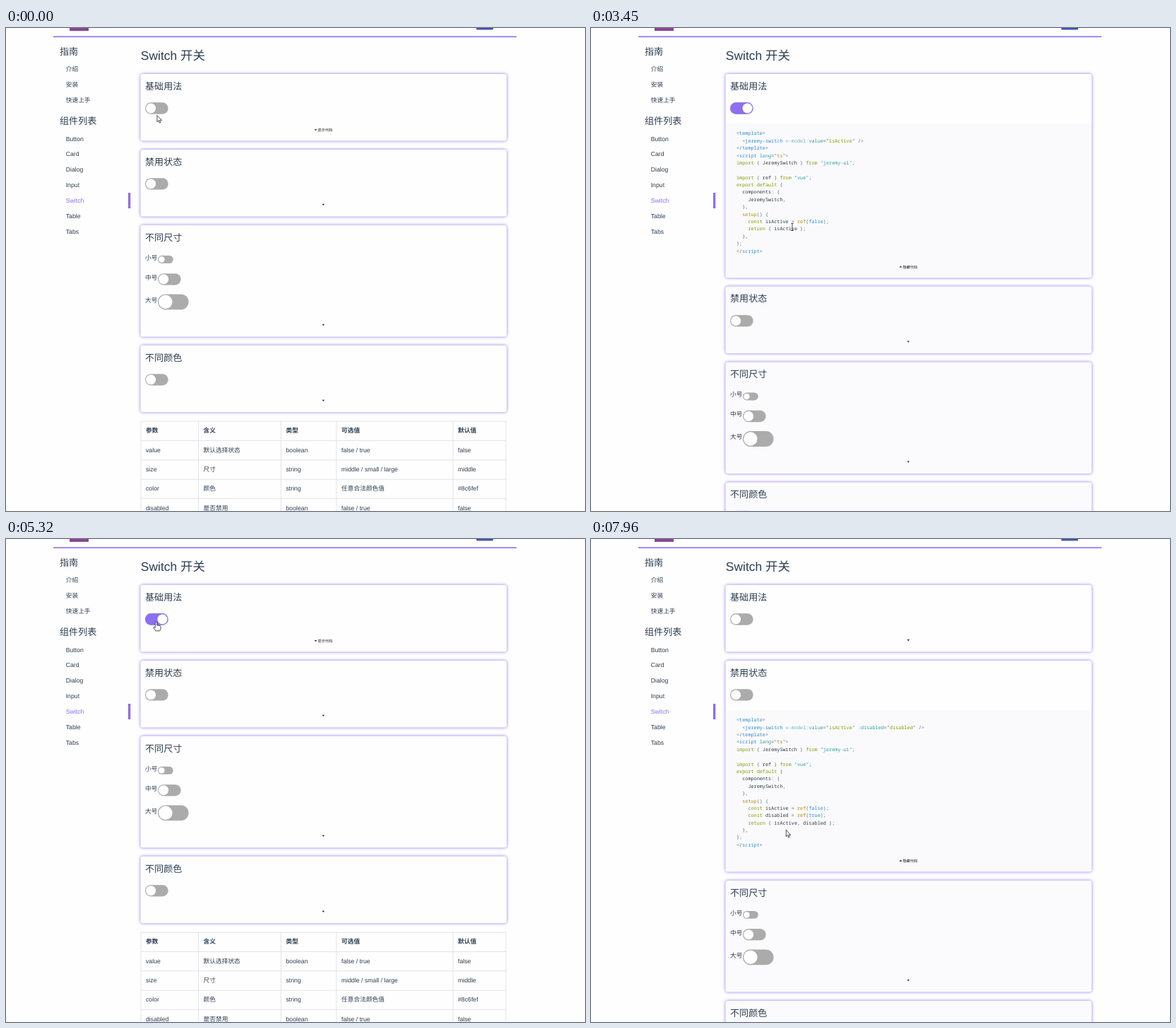
Write an HTML page with a canvas that moves like this. It is 820 px wide and 683 px high and loops after 8000 ms.

```html
<!DOCTYPE html>
<html lang="zh">
<head>
<meta charset="utf-8">
<title>Switch 开关</title>
<style>
  html, body { margin: 0; width: 100%; height: 100%; overflow: hidden; background: #fefefe; }
  canvas { display: block; width: 820px; height: 683px; }
</style>
</head>
<body>
<canvas id="stage" width="820" height="683"></canvas>
<script>
const ctx = document.getElementById('stage').getContext('2d');
const LOOP = 8000;
const ZOOM = 0.545; // the page is shown zoomed out; font sizes are in page pixels
const SANS = '"Liberation Sans", "Noto Sans CJK SC", "Noto Sans CJK", sans-serif';
const MONO = '"Noto Sans Mono", "DejaVu Sans Mono", monospace';
const INK = '#2c3e50', PURPLE = '#8c6fef', GREY = '#ababab', PAGE = '#fefefe', TINT = '#fbfbfd';
const CARD = { x: 190.5, w: 518.5, gap: 12.4 };
const CODE = { x: 206, col: 4.095, row: 10.38 };

// Time, hotspot and shape of the pointer; each pose holds until the next.
const POINTER = [
  [0, 214, 123.5, 'arrow'], [120, 215, 119, 'hand'], [240, 214, 114, 'hand'],
  [760, 222, 109, 'hand'], [880, 330, 176, 'arrow'], [1000, 418, 190, 'arrow'],
  [1120, 450, 157, 'arrow'], [1240, 448.5, 143.5, 'hand'], [1510, 448.5, 143.5, 'arrow'],
  [1920, 430, 195, 'arrow'], [2040, 398.5, 246, 'arrow'], [2180, 227, 225, 'arrow'],
  [2300, 240, 200, 'arrow'], [2460, 268, 222, 'arrow'], [2580, 301, 250, 'arrow'],
  [2700, 292, 270, 'beam'], [2820, 287, 279, 'beam'], [2940, 285, 281.5, 'beam'],
  [3690, 300, 288, 'beam'], [3810, 335, 303, 'arrow'], [3930, 412, 326, 'arrow'],
  [4050, 447, 343, 'arrow'], [4170, 450, 340, 'hand'], [4290, 452.5, 337.5, 'hand'],
  [4660, 452.5, 337.5, 'arrow'], [4820, 300, 150, 'arrow'], [4940, 203, 105, 'hand'],
  [5080, 206, 110, 'hand'], [5200, 210, 114, 'hand'], [5320, 212.6, 117.5, 'hand'],
  [5810, 230, 233, 'arrow'], [5960, 227, 231, 'arrow'], [6080, 223.5, 222.5, 'no'],
  [6580, 228, 228, 'arrow'], [6720, 310, 248, 'arrow'], [6840, 420, 258, 'arrow'],
  [6960, 479, 258, 'arrow'], [7090, 438.6, 249.7, 'hand'], [7460, 438.6, 249.7, 'arrow'],
  [7580, 434, 275, 'arrow'], [7700, 400, 318, 'arrow'], [7820, 303, 381, 'arrow'],
  [7960, 276.3, 411.5, 'arrow']
];

const SHAPES = {
  arrow: new Path2D('M0 0V9.3L2.1 7.3L3.6 10.6L5 10L3.6 6.9H6.5Z'),
  hand: new Path2D('M-1.2 7V.8Q-1.2-.2 0-.2Q1.2-.2 1.2.8V4.4L5.4 5.1Q6.5 5.4 6.5 6.6V9L5.3 12.4H-.8L-3.4 8.4Q-3.8 6.6-2.4 6.7L-1.2 7.9Z'),
  beam: new Path2D('M-1.6-5H1.6M0-5V5M-1.6 5H1.6'),
  no: new Path2D('M4.6 0A4.6 4.6 0 1 1-4.6 0A4.6 4.6 0 1 1 4.6 0M-3.2-3.2L3.2 3.2')
};

const codeText = (attr, setup) => `<template>
  <jeremy-switch v-model:value="isActive"${attr} />
</template>
<script lang="ts">
import { JeremySwitch } from "jeremy-ui";

import { ref } from "vue";
export default {
  components: {
    JeremySwitch,
  },
  setup() {
    const isActive = ref(false);
${setup}
  },
};
<\/script>`.split('\n');

const BASIC = codeText('', '    return { isActive };');
const DISABLED = codeText(' :disabled="disabled"',
  '    const disabled = ref(true);\n    return { isActive, disabled };');

const MARKUP = /(?<tag>(?<=<\/?)[\w-]+)|(?<space>v-model:)|(?<string>[:\w]+(?==))|(?<keyword>\w+)|(?<punct>[<>\/="]+)/g;
const SCRIPT = /(?<string>"[^"]*")|(?<keyword>\b(?:import|from|export|default|const|return)\b)|(?<tag>true|false)|(?<call>\w+(?=\())|(?<plain>\w+)|(?<punct>[^\w\s"]+)/g;
const SYNTAX = {
  tag: '#268bd2', space: 'rgba(42,161,152,.7)', string: '#2aa198', keyword: '#859900',
  call: '#b58900', plain: '#2b3a42', punct: '#586e75'
};

const TABLE = {
  cols: [191, 272.5, 389.5, 468, 633, 708],
  rows: [
    ['参数', '含义', '类型', '可选值', '默认值'],
    ['value', '默认选择状态', 'boolean', 'false / true', 'false'],
    ['size', '尺寸', 'string', 'middle / small / large', 'middle'],
    ['color', '颜色', 'string', '任意合法颜色值', '#8c6fef'],
    ['disabled', '是否禁用', 'boolean', 'false / true', 'false']
  ]
};

// Text centred vertically on cy.
function text(str, x, cy, size, { color = INK, family = SANS, weight = '' } = {}) {
  ctx.save();
  ctx.translate(x, cy + size * ZOOM * 0.36);
  ctx.scale(ZOOM, ZOOM);
  ctx.font = `${weight} ${size}px ${family}`;
  ctx.textRendering = 'geometricPrecision';
  ctx.fillStyle = color;
  ctx.fillText(str, 0, 0);
  ctx.restore();
}

function box(x, y, w, h, color) {
  ctx.fillStyle = color;
  ctx.fillRect(x, y, w, h);
}

function pill(x, y, w, h, r, color) {
  ctx.fillStyle = color;
  ctx.beginPath();
  ctx.roundRect(x, y, w, h, r);
  ctx.fill();
}

function toggle(x, cy, height, on = 0) {
  const h = height * ZOOM, w = 2 * h;
  pill(x, cy - h / 2, w, h, h / 2, GREY);
  ctx.globalAlpha = on;
  pill(x, cy - h / 2, w, h, h / 2, PURPLE);
  ctx.globalAlpha = 1;
  ctx.fillStyle = '#fff';
  ctx.beginPath();
  ctx.arc(x + h / 2 + on * (w - h), cy, h / 2 - 1.2, 0, 7);
  ctx.fill();
}

function drawCode(lines, top, override) {
  lines.forEach((line, row) => {
    const rule = line.startsWith('<') || line.startsWith('  <') ? MARKUP : SCRIPT;
    for (const m of line.matchAll(rule)) {
      const kind = Object.keys(m.groups).find(k => m.groups[k]);
      text(m[0], CODE.x + m.index * CODE.col, top + row * CODE.row, 12.52,
        { color: override || SYNTAX[kind], family: MONO });
    }
  });
}

function drawSelection(lines, top) {
  const x = CODE.x + 19 * CODE.col, y = top + 13 * CODE.row - 5.2;
  box(x, y, 5 * CODE.col, CODE.row, '#3390ff');
  ctx.save();
  ctx.beginPath();
  ctx.rect(x, y, 5 * CODE.col, CODE.row);
  ctx.clip();
  drawCode(lines, top, '#fff');
  ctx.restore();
}

function caret(x, cy, up) {
  const d = up ? -1 : 1;
  ctx.fillStyle = '#333';
  ctx.beginPath();
  ctx.moveTo(x - 1.9, cy - d);
  ctx.lineTo(x + 1.9, cy - d);
  ctx.lineTo(x, cy + 1.3 * d);
  ctx.fill();
}

function drawCard(card, pointer) {
  const { y, h, lines } = card, bottom = y + h;
  ctx.save();
  ctx.shadowColor = PURPLE;
  ctx.shadowBlur = 4.6;
  pill(CARD.x, y, CARD.w, h, 3.5, card.fill);
  ctx.restore();
  text(card.title, 197, y + 17, 24);
  if (lines) {
    pill(CARD.x + 0.5, y + 70, CARD.w - 1, h - 70.5, [0, 0, 3, 3], '#fafafc');
    drawCode(lines, y + 84);
    if (card.selected) drawSelection(lines, y + 84);
  }
  if (card.sizes) {
    [['小号', 48.5, 20], ['中号', 76.5, 30], ['大号', 108.5, 40]].forEach(([name, dy, size]) => {
      text(name, 197, y + dy - 2.8, 16);
      toggle(215, y + dy, size);
    });
  } else {
    toggle(197, y + 48.5, 30, card.on);
  }
  const hover = pointer.y >= y && pointer.y <= bottom;
  if (hover || lines) {
    caret(438.6, bottom - 15.6, lines);
    text(lines ? '隐藏代码' : '显示代码', 441.6, bottom - 15.5, 9.5, { color: '#111', weight: 500 });
  } else {
    caret(449.4, bottom - 16.6);
  }
}

function drawTable(y) {
  const { cols, rows } = TABLE, pitch = 27.35;
  rows.forEach((cells, r) => {
    const top = y + r * pitch;
    box(cols[0], top, cols[5] - cols[0], 1, '#e3e4e8');
    cells.forEach((cell, c) =>
      text(cell, cols[c] + 7, top + 13.5, 16, { weight: r ? '' : 'bold' }));
  });
  cols.forEach(x => box(x - 0.5, y, 1, 140, '#e3e4e8'));
}

function drawFrame() {
  box(90, 0, 27, 4, '#8b4397');
  pill(666, -4, 24, 6.5, 1.5, '#4451b5');
  box(67, 11.5, 656, 1.6, PURPLE);
  text('指南', 76, 33.5, 24);
  ['介绍', '安装', '快速上手'].forEach((s, i) => text(s, 84.7, 58 + i * 21.9, 16));
  text('组件列表', 76, 131.5, 24);
  ['Button', 'Card', 'Dialog', 'Input', 'Switch', 'Table', 'Tabs'].forEach((s, i) =>
    text(s, 84.7, 156.4 + i * 21.85, 16, { color: s === 'Switch' ? PURPLE : INK }));
  box(173, 233, 3.3, 22, PURPLE);
  text('Switch 开关', 190.8, 38.8, 32);
}

function drawPointer({ x, y, shape }) {
  ctx.save();
  ctx.translate(x, y);
  const path = SHAPES[shape];
  if (shape !== 'beam') {
    ctx.fillStyle = '#fff';
    ctx.fill(path);
  }
  ctx.strokeStyle = '#222';
  ctx.lineWidth = shape === 'no' ? 1.5 : 0.8;
  ctx.lineJoin = 'round';
  ctx.stroke(path);
  ctx.restore();
}

// The switch takes one half-way step in each direction.
function switchState(t) {
  if (t < 490 || t >= 5690) return 0;
  return t < 610 || t >= 5570 ? 0.5 : 1;
}

function draw(t) {
  const [, px, py, shape] = POINTER.findLast(p => p[0] <= t);
  const pointer = { x: px, y: py, shape };
  const cards = [
    { title: '基础用法', on: switchState(t), lines: t >= 1510 && t < 4540 && BASIC, selected: t >= 3570 },
    { title: '禁用状态', on: 0, lines: t >= 7460 && DISABLED },
    { title: '不同尺寸', sizes: true },
    { title: '不同颜色', on: 0 }
  ];

  box(0, 0, 820, 683, PAGE);
  drawFrame();
  let y = 65, fill = PAGE;
  for (const card of cards) {
    const extra = card.lines ? 193.7 + (card.lines.length - 17) * CODE.row : 0;
    Object.assign(card, { y, fill, h: (card.sizes ? 157.6 : 94.5) + extra });
    drawCard(card, pointer);
    if (card.lines) fill = TINT;
    y += card.h + CARD.gap;
  }
  drawTable(y);
  drawPointer(pointer);
}

function tick() {
  draw(performance.now() % LOOP);
  requestAnimationFrame(tick);
}
tick();
</script>
</body>
</html>
```
